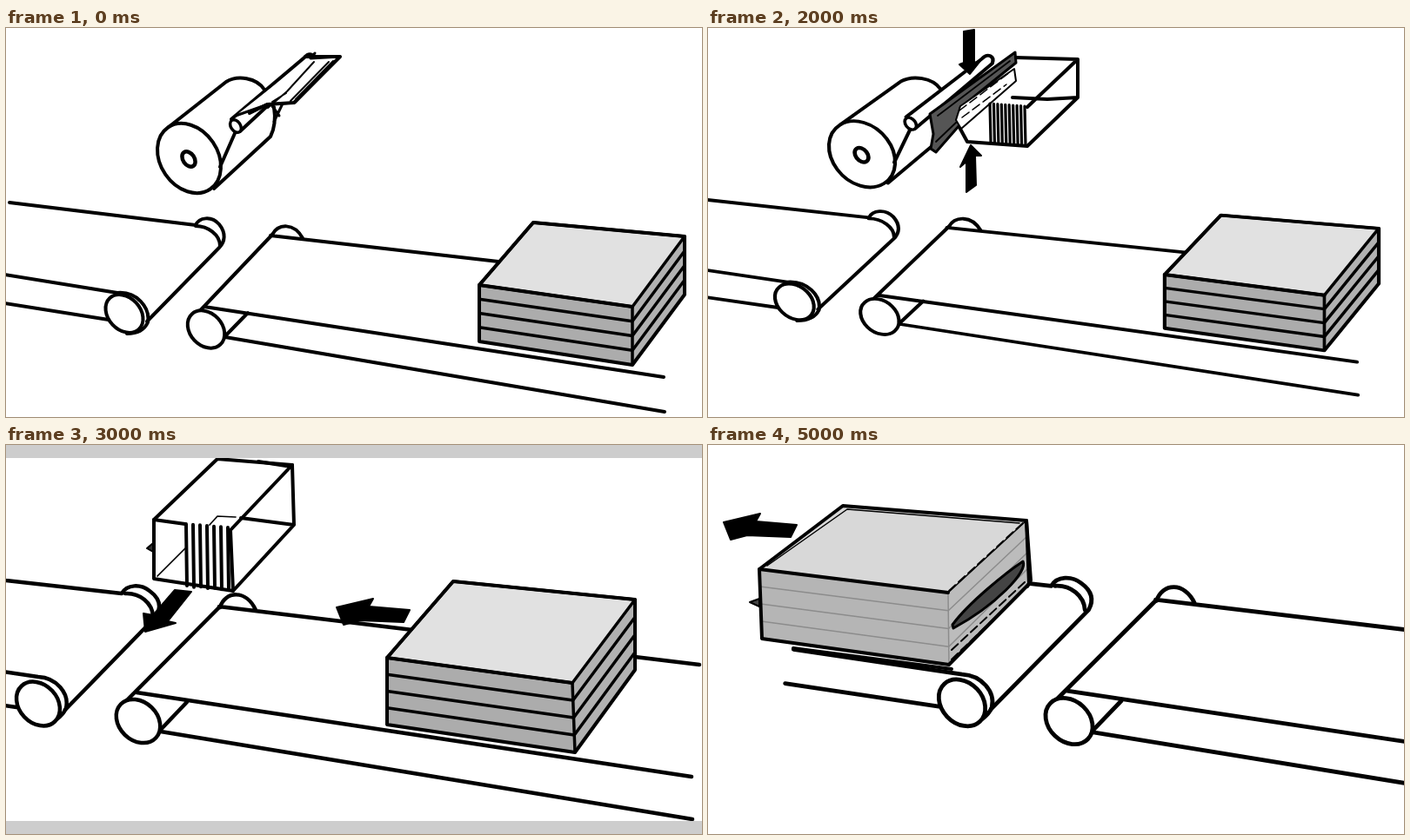
Animation of 800x448 px, one loop 6000 ms. Source, as an HTML page with a canvas:

```html
<!DOCTYPE html>
<html lang="en">
<head>
<meta charset="utf-8">
<title>Stack wrapping</title>
<style>
  html, body { margin: 0; width: 100%; height: 100%; overflow: hidden; background: #fff; }
  canvas { display: block; }
</style>
</head>
<body>
<canvas id="stage" width="800" height="448"></canvas>
<script>
const ctx = document.getElementById('stage').getContext('2d');
const STEP = 1000;

function ink(d, width = 4, fill, color = '#000') {
  const path = new Path2D(d);
  if (fill) { ctx.fillStyle = fill; ctx.fill(path); }
  if (width) { ctx.strokeStyle = color; ctx.lineWidth = width; ctx.stroke(path); }
}

function dashes(d, width = 2) {
  ctx.setLineDash([10, 5]);
  ink(d, width);
  ctx.setLineDash([]);
}

function oval(x, y, rx, ry, tilt = -0.75, width = 4) {
  ctx.beginPath();
  ctx.ellipse(x, y, rx, ry, tilt, 0, Math.PI * 2);
  ctx.fillStyle = '#fff';
  ctx.fill();
  ctx.strokeStyle = '#000';
  ctx.lineWidth = width;
  ctx.stroke();
}

const poly = points => 'M' + points.map(p => p.join(' ')).join('L') + 'Z';
const mix = (a, b, k) => [a[0] + (b[0] - a[0]) * k, a[1] + (b[1] - a[1]) * k];

// Corners: top left, front, right, back; then bottom left, front, right.
function stack([left, front, right, back, lowLeft, lowFront, lowRight], look = {}) {
  const { top = '#e1e1e1', face = '#acacac', side = '#b1b1b1', seam = '#000', seamWidth = 3.5 } = look;
  ink(poly([left, front, lowFront, lowLeft]), 0, face);
  ink(poly([front, right, lowRight, lowFront]), 0, side);
  for (let i = 1; i < 4; i++) {
    const k = i / 4, corner = mix(front, lowFront, k);
    ink(`M${mix(left, lowLeft, k)}L${corner}L${mix(right, lowRight, k)}`, seamWidth, null, seam);
  }
  ink(`M${front}L${lowFront}`, seamWidth, null, seam);
  ink(poly([left, front, right, back]), seamWidth, top);
  ink(`M${front}L${left}`, 4);
  ink(poly([left, back, right, lowRight, lowFront, lowLeft]), 4);
}

// Gathered film: a row of upright strokes.
function bands(x0, x1, top, bottom, count, width, drop = 0) {
  for (let i = 0; i < count; i++) {
    const k = i / (count - 1), x = x0 + (x1 - x0) * k, y = drop * k;
    ink(`M${x} ${top + y}L${x + 1} ${bottom + y + i % 2}`, width);
  }
}

function leftArrow(x, y, scale = 1) {
  ctx.save();
  ctx.translate(x, y);
  ctx.scale(scale, scale);
  ink('M1 0L43 -10L38 -1L85 3L78 17L28 15L9 20Z', 2, '#000');
  ctx.restore();
}

function placed(sx, tx, sy, ty, draw) {
  ctx.save();
  ctx.transform(sx, 0, 0, sy, tx, ty);
  draw();
  ctx.restore();
}

function wideView() {
  // infeed and outfeed belts
  ink('M4 201L218 227C222 218 236 216 245 226C253 236 252 246 245 253L162 338');
  ink('M218 228C232 228 246 238 246 251');
  ink('M-8 283L128 305C150 303 166 322 163 339C159 348 150 352 139 352M-8 316L118 336');
  oval(136, 329, 18.5, 24.5);
  ink('M306 238C313 225 331 224 341 242M304 239L566 269');
  ink('M306 238L215 334M228 321L756 402M252 356L757 442M243 364L278 328');
  oval(230, 347, 18.5, 24);
  stack([[544, 296], [720, 321], [780, 240], [606, 224], [544, 361], [720, 388], [780, 307]]);

  // film roll and guide rod
  ink('M187 114L253 62C266 54 288 57 297 71M239 185L304 125C309 115 310 104 308 91');
  oval(210.5, 150, 33, 43, -0.6);
  oval(210, 151, 6.5, 9.5, -0.6, 4.5);
  ink('M246 160L264 119');
  ink('M259 105L343 34C349 27 357 31 354 40L269 119', 4, '#fff');
  oval(264, 113, 5.5, 8, -0.6, 3.5);
}

function closeView() {
  ink('M-115 139L0 156L133 171C139 160 155 160 165 168C176 176 179 186 173 197L68 305', 4.5);
  ink('M137 171C154 170 168 182 169 197', 4.5);
  ink('M-144 240L37 267C58 268 73 286 69 303C65 313 54 321 40 321M-153 277L12 302', 4.5);
  oval(37, 298, 22, 28, -0.75, 4.5);
  ink('M246 187C252 168 276 166 287 190M245 186L797 253', 4.5);
  ink('M245 187L133 300M150 285L788 382M178 330L789 431M170 336L208 296', 4.5);
  oval(152, 318, 22, 28, -0.8, 4.5);
}

function letterbox(color, y, height) {
  ctx.fillStyle = color;
  ctx.fillRect(0, y, 800, height);
  ctx.fillRect(0, 448 - y - height, 800, height);
}

function filmRoll() {
  wideView();
  ink('M264 101L301 88L332 86L384 33L350 35L355 29', 3, '#fff');
  ink('M344 33L384 33L331 86L300 88L280 98');
  ink('M301 92L323 73L354 39M306 85L322 75M376 38L333 82M371 39L327 84', 2);
  ink('M318 87L308 108M306 90L314 101', 3);
}

function openBag() {
  placed(0.99, 10.2, 0.982, -15, wideView);
  ink('M259 22L272 13L311 15L311 9L322 17L290 31L289 25Z', 2, '#000');
  ink('M357 22C388 14 424 17 453 17L453 67L386 63L352 27M453 17L396 77M453 67L401 123L330 115L286 79');
  ink('M286 79C309 70 333 71 358 72M330 115L401 123M358 72L358 118');
  ink('M286 79L318 62L350 28M316 88L329 55L358 30M311 64L324 80M320 82L315 101', 1.7);
  bands(359, 395, 72, 118, 11, 3, 4);
}

function cutFilm() {
  placed(1.043, -42.5, 0.95, 2.8, wideView);
  ink('M294 4L306 2L306 40L313 38L301 53L289 42L294 40Z', 2, '#000');
  ink('M297 189L308 181L307 147L314 147L302 135L290 160L297 154Z', 2, '#000');
  ink('M353 34L425 36L425 80L367 136L298 131L285 107M425 36L367 91M425 80L390 82L350 80M293 86L324 86');
  ink('M255 99L353 28L354 40L290 92L289 112L262 143L256 139L259 122Z', 3, '#555');
  ink('M285 106L290 90L352 47L354 61L291 116Z', 2, '#fff');
  ink('M264 101L347 38M262 131L286 108', 1.8);
  dashes('M289 95L348 50M292 103L343 65', 1.5);
  bands(324, 364, 87, 131, 10, 3.2, 3);
}

function carryBag() {
  closeView();
  stack([[438, 245], [651, 274], [723, 178], [514, 157], [438, 322], [654, 354], [723, 259]]);
  leftArrow(379, 187);
  ink('M194 167L213 169L186 203L195 205L160 215L158 194L169 196Z', 2, '#000');
  ink('M170 86L243 16L329 23L258 98L261 168L170 154Z', 4, '#fff');
  ink('M329 23L331 92L261 168M170 86L206 91M331 92L270 84M290 19L328 25');
  ink('M169 113L162 119L169 123Z', 2, '#333');
  ink('M174 151L208 117M234 92L243 82L264 83', 1.7);
  bands(207, 255, 91, 162, 7, 4, 4);
  letterbox('#cdcdcd', 0, 15);
}

function wrapStack() {
  placed(1.13, 128, 1.067, -41, closeView);
  stack([[122, 144], [348, 177], [436, 84], [222, 63], [124, 225], [348, 255], [438, 158]],
    { top: '#d2d2d2', face: '#888', side: '#a9a9a9' });
  ink('M122 144L222 63L390 80L300 170Z', 4, '#dadada');
  ink('M122 144L300 170L300 250L124 225Z', 4, '#bdbdbd');
  for (let i = 1; i < 4; i++) ink(`M124 ${144 + i * 20}L267 ${164 + i * 20}`, 1.5, null, '#929292');
  ink('M131 139L226 67L360 77', 1.5);
  ink('M122 179L112 183L122 187Z', 2, '#444');
  bands(267, 299, 162, 249, 5, 4, 5);
  ink('M359 76l8 -3l2 5l7 -4l2 5l7 -4l2 5l7 -4l8 6');
  leftArrow(77, 92);
  leftArrow(463, 219, 1.12);
  letterbox('#cdcdcd', 0, 15);
  letterbox('#4b4b4b', 15, 45);
}

function wrappedStack() {
  placed(1.07, 252.4, 1.06, -19, closeView);
  stack([[59, 143], [276, 170], [366, 87], [155, 70], [62, 223], [277, 253], [369, 160]],
    { top: '#d8d8d8', face: '#b5b5b5', side: '#bcbcbc', seam: '#8c8c8c', seamWidth: 1.5 });
  ink('M68 139L160 74L358 90', 1.5);
  dashes('M277 168L364 88M280 236L364 158M280 247L365 165');
  ink('M281 207C300 181 344 146 362 134C368 146 330 185 282 211Z', 3, '#444');
  ink('M366 87L371 156L367 163');
  ink('M59 177L48 181L59 186Z', 2, '#444');
  ink('M98 234L280 258');
  leftArrow(17, 89);
}

const scenes = [filmRoll, openBag, cutFilm, carryBag, wrapStack, wrappedStack];
ctx.lineCap = ctx.lineJoin = 'round';

function render() {
  ctx.fillStyle = '#fff';
  ctx.fillRect(0, 0, 800, 448);
  scenes[Math.floor(performance.now() / STEP) % scenes.length]();
  requestAnimationFrame(render);
}
render();
</script>
</body>
</html>
```
